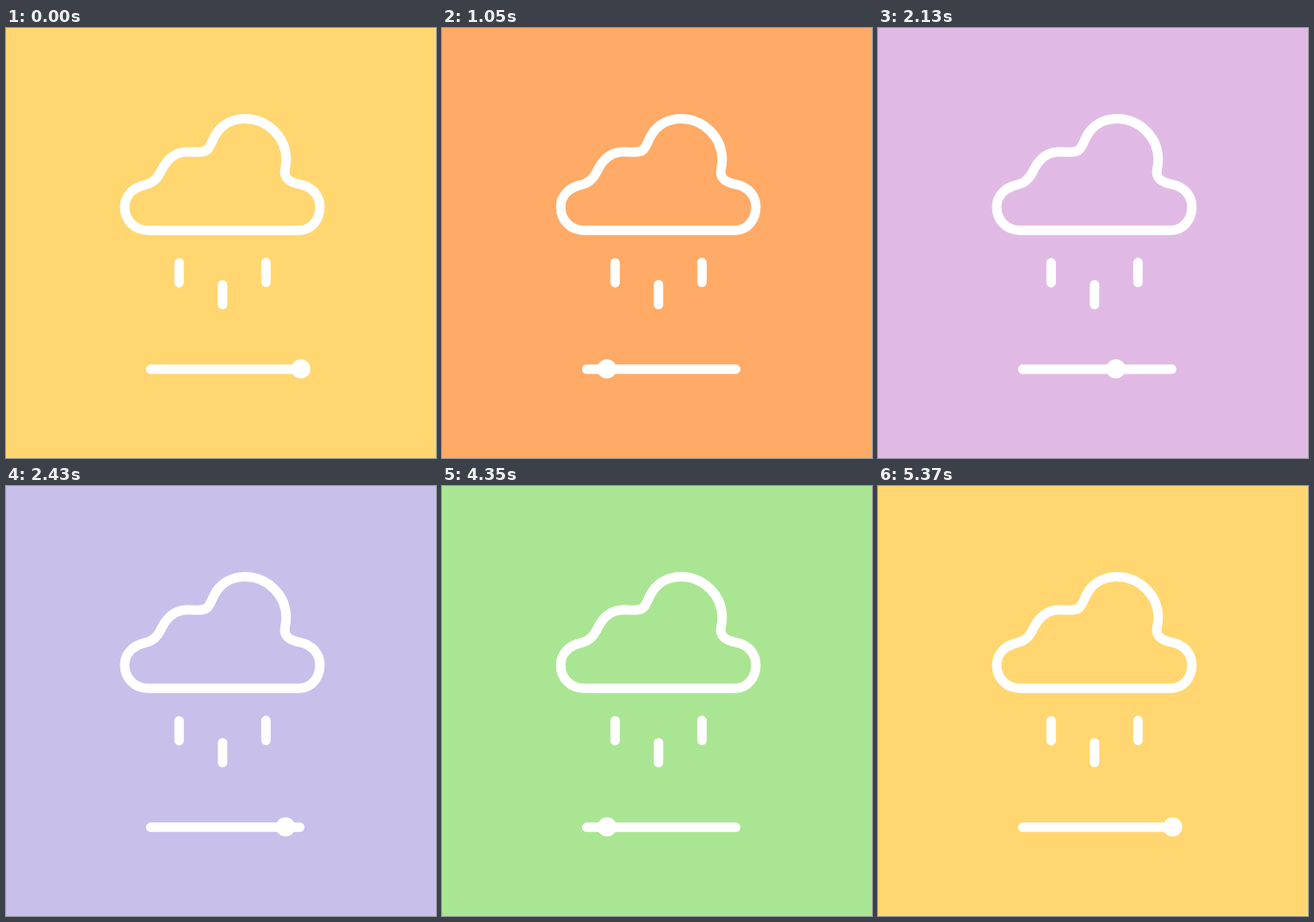
Animation, 500 px wide and 500 px high, one loop 5400 ms. Source, as an HTML page with a canvas:

```html
<!DOCTYPE html>
<html lang="en">
<head>
<meta charset="utf-8">
<title>Rain slider</title>
<style>
html, body { margin: 0; width: 100%; height: 100%; overflow: hidden; background: #ffd670; }
canvas { display: block; width: 500px; height: 500px; }
</style>
</head>
<body>
<canvas id="stage" width="500" height="500"></canvas>
<script>
const ctx = document.getElementById('stage').getContext('2d');
const LOOP = 5400, SWEEP = 1350, FADE = 450;
const LEFT = 170, RIGHT = 342.8;

const yellow = [255, 214, 112], orange = [255, 170, 102], lilac = [224, 186, 228];
const blue = [185, 194, 240], green = [170, 229, 147];

// Each fade: start time and the colour it ends on.
const fades = [[120, orange], [1110, lilac], [2170, blue], [3430, green], [4600, yellow]];

const cloud = new Path2D(`M165 235.2 L341 235.2
  C356 235 365 222 365 208 C365 195 356 184.5 342 181.8
  C329 179.5 322.5 174 324.5 164 C325.3 160 325.8 157 325.8 153
  C325.8 127 304 105.5 278 105.5 C264 105.5 252 112 245 122
  C240 129 239 136 234.5 141 C229 146.5 220 143.5 210 144
  C196 144.5 187 153 181 165 C177 174 171 180 163 182
  C148 185 138 195 138 208 C138 224 150 235.2 165 235.2 Z`);

const ease = u => u * u * (3 - 2 * u);
const clamp = u => Math.min(1, Math.max(0, u));

function background(t) {
  let c = yellow;
  for (const [start, next] of fades) {
    const p = ease(clamp((t - start) / FADE));
    c = c.map((v, i) => v + (next[i] - v) * p);
  }
  return `rgb(${c.map(Math.round).join(',')})`;
}

function knobX(t) {
  const u = Math.abs(1 - (t / SWEEP) % 2);
  return LEFT + (RIGHT - LEFT) * ease(u);
}

function line(x1, y1, x2, y2) {
  ctx.beginPath();
  ctx.moveTo(x1, y1);
  ctx.lineTo(x2, y2);
  ctx.stroke();
}

function draw(t) {
  ctx.fillStyle = background(t);
  ctx.fillRect(0, 0, 500, 500);
  ctx.strokeStyle = ctx.fillStyle = '#fff';
  ctx.lineCap = ctx.lineJoin = 'round';
  ctx.lineWidth = 11;
  ctx.stroke(cloud);

  for (const [x, y] of [[201.3, 273], [251.8, 298.4], [302.3, 272.6]]) line(x, y, x, y + 23.2);
  line(168.2, 396.8, 341.6, 396.8);

  ctx.beginPath();
  ctx.arc(knobX(t), 396.4, 11.2, 0, Math.PI * 2);
  ctx.fill();
}

const begin = performance.now();
function tick() {
  draw((performance.now() - begin) % LOOP);
  requestAnimationFrame(tick);
}
tick();
</script>
</body>
</html>
```
